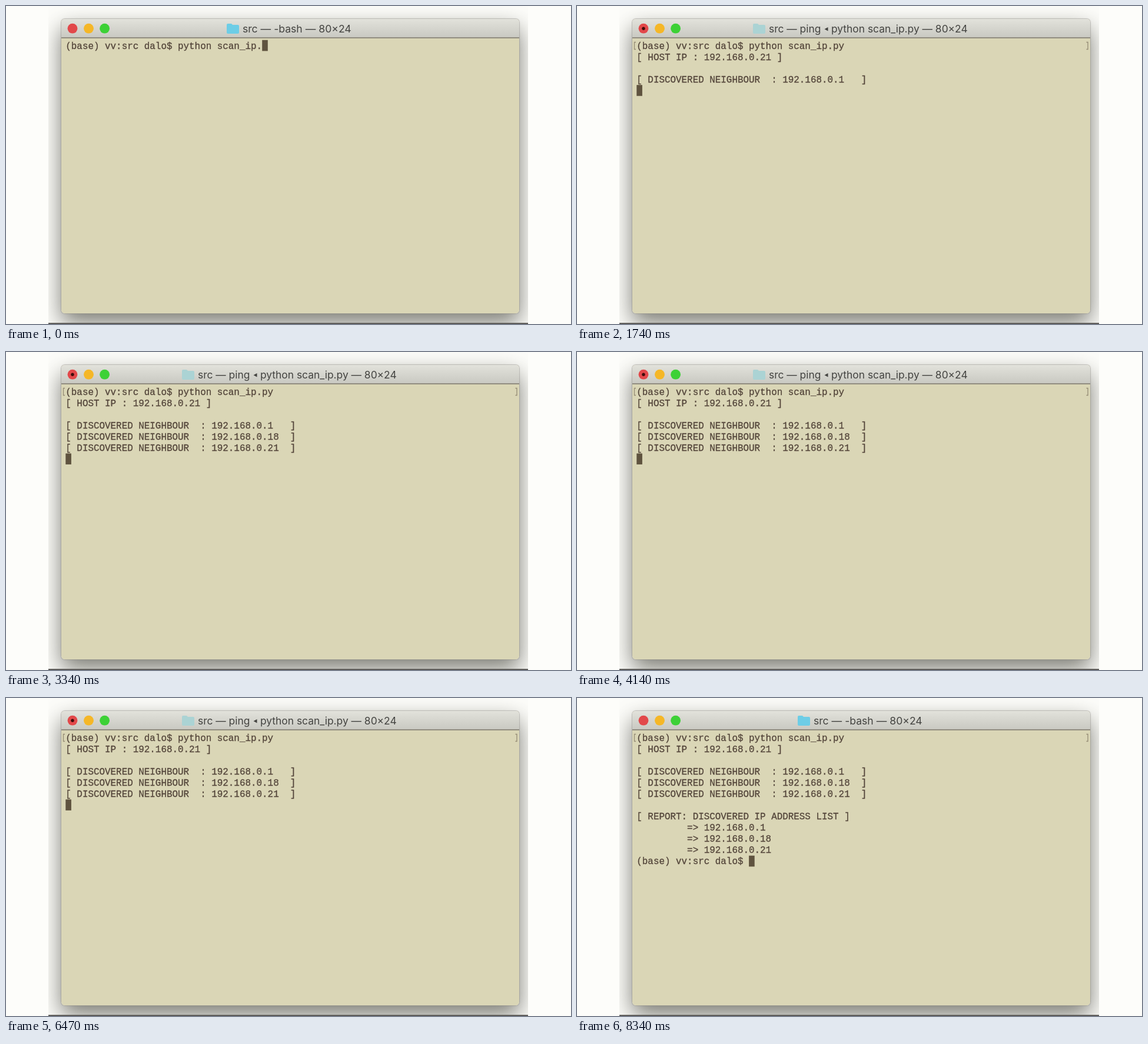
These frames come from a looping animation (960x540 px, 8370 ms). An HTML page:

```html
<!DOCTYPE html>
<html lang="en">
<head>
<meta charset="utf-8">
<title>Network scan in a terminal</title>
<style>
  html, body { margin: 0; width: 100%; height: 100%; overflow: hidden; background: #fdfdfa; }
  #stage { position: relative; width: 960px; height: 540px; overflow: hidden; }
  #shot { position: absolute; left: 72px; top: 0; width: 815px; height: 540px; overflow: hidden; }
  #shade, #win {
    position: absolute; left: 22px; top: 22px; width: 778px; height: 500px; border-radius: 6px;
  }
  #shade { box-shadow: 0 0 1px 1px #8f8c8880, 0 16px 38px rgba(72, 72, 62, .72); }
  #win { background: #dad6b6; overflow: hidden; }
  #bar { height: 31px; background: linear-gradient(#e2e2db, #c9c9c2); border-bottom: 2px solid #918d80; }
  #floor { position: absolute; left: 0; top: 538px; width: 815px; height: 2px; background: #5f5d5a; }
  svg { position: absolute; left: 0; top: 0; }
  text { white-space: pre; }
  .title { font: 17.6px Inter, Roboto, sans-serif; fill: #434340; }
  #busy .title { font-size: 17.4px; }
  .mono {
    font: 15.9px "Liberation Mono", "Courier New", monospace;
    fill: #53453a; stroke: #53453a; stroke-width: .3px;
  }
</style>
</head>
<body>
<div id="stage">
  <div id="shot">
    <div id="shade"></div>
    <div id="win"><div id="bar"></div></div>
    <div id="floor"></div>
  </div>
  <svg width="960" height="540" viewBox="0 0 960 540">
    <defs>
      <path id="folder" d="M0 2q0-2 2-2h6l2 2h9q2 0 2 2v11q0 2-2 2h-17q-2 0-2-2z"/>
    </defs>
    <circle cx="113" cy="38.2" r="8.4" fill="#e2484a"/>
    <circle cx="140.5" cy="38.2" r="8.4" fill="#f5b727"/>
    <circle cx="167.6" cy="38.2" r="8.4" fill="#3dd136"/>
    <g id="idle">
      <use href="#folder" x="375" y="30" fill="#6dcde6"/>
      <text class="title" x="402" y="45">src — -bash — 80×24</text>
    </g>
    <g id="busy">
      <circle cx="113" cy="38.2" r="2.7" fill="#3d0d0b"/>
      <use href="#folder" x="299" y="30" fill="#abd3d4"/>
      <text class="title" x="326" y="45">src — ping</text>
      <path d="M426.500 36v6.500l-6-3.250z" fill="#434340"/>
      <text class="title" x="432" y="45">python scan_ip.py — 80×24</text>
    </g>
    <path id="marks" d="M100 61.500h-2.500v12h2.500M865.500 61.500h2.500v12h-2.500"
      fill="none" stroke="#958b74" stroke-width="1.300"/>
    <g id="rows"></g>
    <rect id="cursor" width="9.600" height="18.600" fill="#5f533f"/>
  </svg>
</div>
<script>
const LOOP = 8370, LEFT = 101.3, TOP = 57.8, CELL = 9.54, LINE = 19.08;
const ENTER = 1000, START = 1080, DONE = 7700;
const $ = id => document.getElementById(id);

const prompt = "(base) vv:src dalo$ ";
const command = prompt + "python scan_ip.py ";
// [time, visible characters of the command]
const typing = [[0, 35], [110, 36], [240, 37], [380, 38]];
const found = ip => `[ DISCOVERED NEIGHBOUR  : ${ip.padEnd(14)}]`;
const listed = ip => " ".repeat(9) + "=> " + ip;
const ips = ["192.168.0.1", "192.168.0.18", "192.168.0.21"];

// [time, row, text]
const lines = [
  [0, 0, command],
  [START, 1, "[ HOST IP : 192.168.0.21 ]"],
  [1140, 3, found(ips[0])],
  [1950, 4, found(ips[1])],
  [2300, 5, found(ips[2])],
  [DONE, 7, "[ REPORT: DISCOVERED IP ADDRESS LIST ]"],
  ...ips.map((ip, i) => [DONE, 8 + i, listed(ip)]),
  [DONE, 11, prompt]
];

const nodes = lines.map(([, row, text]) => {
  const node = document.createElementNS("http://www.w3.org/2000/svg", "text");
  node.setAttribute("class", "mono");
  node.setAttribute("x", LEFT);
  node.setAttribute("y", TOP + row * LINE + 14.8);
  node.textContent = text;
  $("rows").append(node);
  return node;
});

const show = (node, on) => { node.style.display = on ? "" : "none"; };

function draw(t) {
  const typed = typing.filter(step => t >= step[0]).pop()[1];
  const text = command.slice(0, typed);
  if (nodes[0].textContent !== text) nodes[0].textContent = text;
  let last = 0;
  lines.forEach(([at, row], i) => {
    show(nodes[i], t >= at);
    if (t >= at) last = row;
  });
  const running = t >= START && t < DONE;
  show($("busy"), running);
  show($("idle"), !running);
  show($("marks"), t >= ENTER);

  const col = t < START ? typed : running ? 0 : prompt.length;
  const row = running ? last + 1 : last;
  $("cursor").setAttribute("x", LEFT + col * CELL);
  $("cursor").setAttribute("y", TOP + row * LINE);
}

const began = performance.now();
function tick() {
  draw((performance.now() - began) % LOOP);
  requestAnimationFrame(tick);
}
tick();
</script>
</body>
</html>
```
